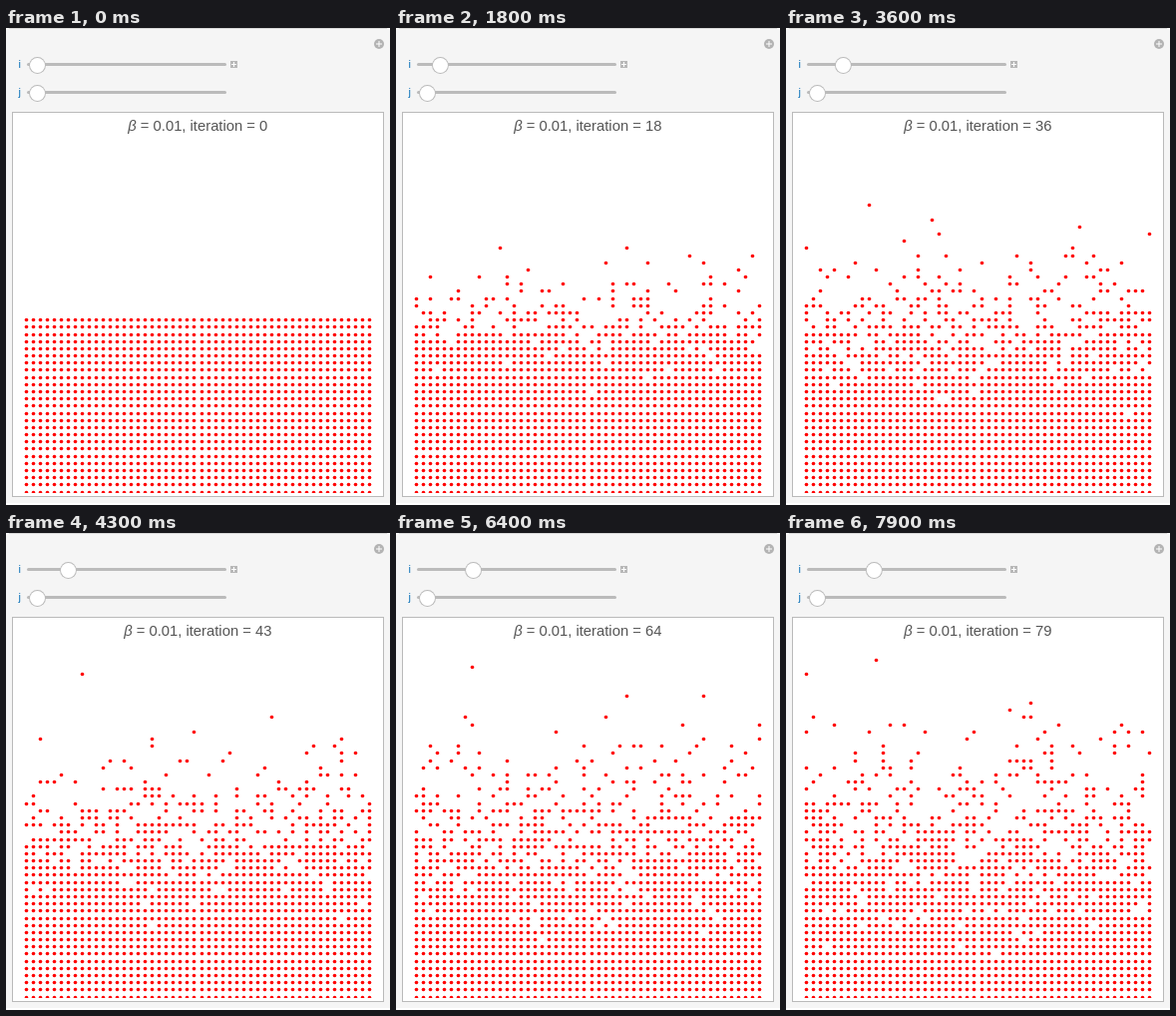
Write an HTML page with a canvas that moves like this. It is 385 px wide and 478 px high and loops after 8000 ms.

```html
<!DOCTYPE html>
<html lang="en">
<head>
<meta charset="utf-8">
<title>Lattice gas</title>
<style>
html, body { margin: 0; width: 100%; height: 100%; overflow: hidden; background: #fff; }
canvas { display: block; width: 385px; height: 478px; }
</style>
</head>
<body>
<canvas width="385" height="478"></canvas>
<script>
const ctx = document.querySelector('canvas').getContext('2d');
const N = 50, STEPS = 80, STEP_MS = 100, BETA = 0.01;

let seed = 2024;
function random() {
  seed = (seed + 0x6D2B79F5) | 0;
  let t = Math.imul(seed ^ (seed >>> 15), 1 | seed);
  t = (t + Math.imul(t ^ (t >>> 7), 61 | t)) ^ t;
  return ((t ^ (t >>> 14)) >>> 0) / 4294967296;
}
const pick = n => Math.floor(random() * n);

// Particles hop to random free neighbours; climbing costs energy.
function sweep(grid) {
  const next = grid.slice();
  for (let k = 0; k < N * N; k++) {
    const col = pick(N), row = pick(N), dir = pick(4);
    const toCol = (col + [1, -1, 0, 0][dir] + N) % N;
    const toRow = row + [0, 0, 1, -1][dir];
    if (toRow < 0 || toRow >= N) continue;
    const a = row * N + col, b = toRow * N + toCol;
    const rise = (toRow - row) * (next[a] - next[b]);
    if (random() < Math.exp(-BETA * rise)) [next[a], next[b]] = [next[b], next[a]];
  }
  return next;
}

const states = [Array.from({ length: N * N }, (_, i) => i < N * N / 2 ? 1 : 0)];
while (states.length < STEPS) states.push(sweep(states[states.length - 1]));

function disc(x, y, r, fill) {
  ctx.beginPath();
  ctx.arc(x, y, r, 0, 2 * Math.PI);
  ctx.fillStyle = fill;
  ctx.fill();
}

function plus(x, y, r) {
  ctx.fillStyle = '#fff';
  ctx.fillRect(x - r, y - 0.5, 2 * r, 1);
  ctx.fillRect(x - 0.5, y - r, 1, 2 * r);
}

function setFont(font) {
  ctx.font = font + ' "Liberation Sans", Arial, sans-serif';
}

function text(str, x, y, font, color) {
  setFont(font);
  ctx.fillStyle = color;
  ctx.fillText(str, x, y);
  return ctx.measureText(str).width;
}

function slider(label, y, knob) {
  text(label, 12.5, y + 3, '11px', '#0a70b8');
  ctx.fillStyle = '#bbb';
  ctx.beginPath();
  ctx.roundRect(21, y - 1.5, 200, 3, 1.5);
  ctx.fill();
  disc(knob, y + 1, 8.4, '#bababa');
  disc(knob, y + 1, 7.5, '#fff');
}

function panel() {
  ctx.fillStyle = '#fff';
  ctx.fillRect(0, 0, 385, 478);
  ctx.fillStyle = '#f5f5f5';
  ctx.beginPath();
  ctx.roundRect(0, 0, 385, 476, [4, 4, 0, 0]);
  ctx.fill();
  ctx.fillStyle = '#dcdcdc';
  ctx.fillRect(3, 0, 379, 1);
  disc(374, 16, 5, '#b3b3b3');
  plus(374, 16, 3);
  ctx.fillStyle = '#b8b8b8';
  ctx.fillRect(225, 33, 7, 7);
  plus(228.5, 36.5, 2.5);
  ctx.fillStyle = '#fff';
  ctx.strokeStyle = '#bababa';
  ctx.lineWidth = 1;
  ctx.fillRect(6.5, 84.5, 372, 385);
  ctx.strokeRect(6.5, 84.5, 372, 385);
}

function title(step) {
  const size = '14.8px', color = '#555', rest = ` = 0.01, iteration = ${step}`;
  setFont(size);
  const x = 192.3 - (ctx.measureText(rest).width + 8.5) / 2;
  const w = text('β', x, 103, 'italic ' + size, color);
  text(rest, x + w, 103, size, color);
}

function dots(grid) {
  ctx.save();
  ctx.beginPath();
  ctx.rect(7, 85, 371, 381);
  ctx.clip();
  grid.forEach((on, i) => {
    if (!on) return;
    const col = i % N, row = Math.floor(i / N);
    disc(20.5 + Math.round(7.02 * col), 465.5 - Math.ceil(7.18 * row), 1.8, '#f00');
  });
  ctx.restore();
}

const start = performance.now();
function frame() {
  const step = Math.floor((performance.now() - start) / STEP_MS) % STEPS;
  panel();
  slider('i', 36.5, 31.5 + 0.72 * step);
  slider('j', 64.5, 31.5);
  title(step);
  dots(states[step]);
  requestAnimationFrame(frame);
}
frame();
</script>
</body>
</html>
```
